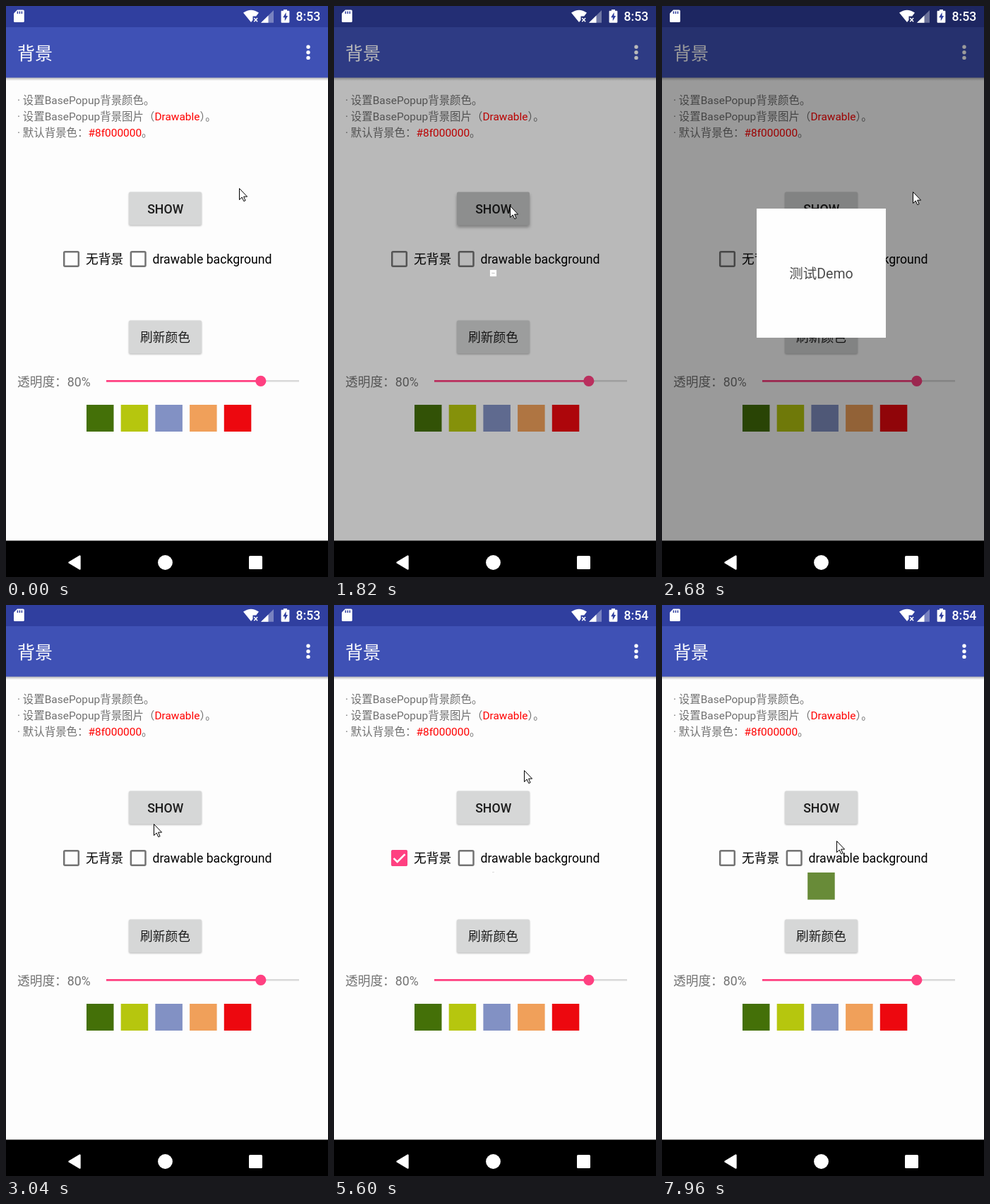
An HTML page that plays this animation: 456 px wide and 809 px high, repeating every 7.99 s.

```html
<!DOCTYPE html>
<html lang="zh-CN">
<head>
<meta charset="utf-8">
<title>背景</title>
<style>
html, body { margin: 0; width: 100%; height: 100%; overflow: hidden; background: #fdfdfd; }
svg { display: block; width: 456px; height: 809px; font: 17.7px Roboto, "Noto Sans CJK SC", "Noto Sans CJK", sans-serif; }
text { white-space: pre; }
.note { font-size: 15.45px; fill: #707070; }
.red { fill: #f00; }
.mid { text-anchor: middle; }
.btn { fill: #d6d7d7; filter: drop-shadow(0 1px 1px rgba(0,0,0,.28)); }
.btn.up { filter: drop-shadow(0 3px 2px rgba(0,0,0,.32)); }
.box { fill: none; stroke: #737373; stroke-width: 2.5; }
</style>
</head>
<body>
<svg viewBox="0 0 456 809">
  <rect width="456" height="809" fill="#fdfdfd"/>
  <defs>
    <linearGradient id="fade" x2="0" y2="1">
      <stop stop-opacity=".3"/><stop offset="1" stop-opacity="0"/>
    </linearGradient>
  </defs>
  <rect y="101" width="456" height="5" fill="url(#fade)"/>
  <rect y="30" width="456" height="71.5" fill="#3f51b5"/>
  <rect width="456" height="30" fill="#303f9f"/>
  <text x="16" y="76" font-size="25" fill="#fff">背景</text>
  <g fill="#fff">
    <circle cx="428" cy="58" r="2.7"/><circle cx="428" cy="65.7" r="2.7"/><circle cx="428" cy="73.4" r="2.7"/>
  </g>

  <text class="note" x="16" y="138.7">· 设置BasePopup背景颜色。</text>
  <text class="note" x="16" y="161.9">· 设置BasePopup背景图片（<tspan class="red">Drawable</tspan>）。</text>
  <text class="note" x="16" y="185">· 默认背景色：<tspan class="red">#8f000000</tspan>。</text>

  <rect id="show" class="btn" x="174" y="263.5" width="103" height="47" rx="2"/>
  <text class="mid" x="225.7" y="294" font-weight="500" fill="#1c1c1c">SHOW</text>
  <rect class="btn" x="174" y="445.5" width="103" height="47" rx="2"/>
  <text class="mid" x="225.5" y="475.5" fill="#1c1c1c">刷新颜色</text>

  <circle id="ripple" cx="92" cy="358.5" r="25" fill="#ff4081"/>
  <rect class="box" x="82.2" y="348.2" width="20.6" height="20.6" rx="1.5"/>
  <g id="check">
    <rect x="81" y="347" width="23" height="23" rx="2.5" fill="#ff4081"/>
    <path d="M84.5 358.8l5.2 5.2 10.8-10.8" fill="none" stroke="#fff" stroke-width="2.6"/>
  </g>
  <text x="113" y="365.3">无背景</text>
  <rect class="box" x="176.9" y="348.2" width="20.6" height="20.6" rx="1.5"/>
  <text x="207.5" y="365.3">drawable background</text>

  <text x="16" y="539" fill="#737373">透明度：80%</text>
  <path d="M361 531.3H415" stroke="#d9d9d9" stroke-width="2.4"/>
  <path d="M142 531.3H361" stroke="#ff4081" stroke-width="2.8"/>
  <circle cx="360.8" cy="531.3" r="7.6" fill="#ff4081"/>
  <g id="swatches"></g>
  <rect id="chip" width="38.5" height="38.5" fill="#447008" opacity=".8"/>

  <rect id="dim" width="456" height="758"/>
  <g id="popup">
    <rect x="-96.5" y="-96.5" width="193" height="193" fill="#fefefe"/>
    <text class="mid" y="7.5" font-size="20.6" fill="#4c4c4c">测试Demo</text>
  </g>

  <g fill="#fff">
    <path d="M16 5.5h8.2q1.6 0 1.6 1.6v14.4q0 1.6-1.6 1.6H12.6q-1.6 0-1.6-1.6V10.5z"/>
    <path d="M16.4 7.5v3.6M19.4 7.5v3.6M22.4 7.5v3.6" stroke="#303f9f" stroke-width="1.5"/>
    <path d="M336 9.6Q347 2 358 9.6L354.2 14.5H349.5V20L347 23z"/>
    <path d="M351.3 17l4.8 5.2M356.1 17l-4.8 5.2" stroke="#fff" stroke-width="1.5"/>
    <path d="M361 23.7L379 6v17.7z" opacity=".35"/>
    <path d="M361 23.7L371.5 13.4v10.3z"/>
    <path d="M393 5h5v1.8h2.4q1 0 1 1v14.9q0 1-1 1h-9.8q-1 0-1-1V7.8q0-1 1-1H393z"/>
    <path d="M396.6 9l-4.4 7.2h2.6v5l4.4-7.3h-2.6z" fill="#303f9f"/>
    <text id="clock" x="410.5" y="21.3" font-weight="500"></text>
  </g>

  <rect y="757.5" width="456" height="52"/>
  <g fill="#fff">
    <path d="M104.5 779.5v18L89.5 788.5z" stroke="#fff" stroke-width="2.4" stroke-linejoin="round"/>
    <circle cx="225.5" cy="788.5" r="10.4"/>
    <rect x="344" y="779" width="19" height="19" rx="1.5"/>
  </g>

  <path id="cursor" d="M.5.5v16l3.7-3.5 2.6 5.6 2.3-1-2.5-5.5h5z" fill="#fff" stroke="#000"/>
</svg>
<script>
const LOOP = 7990, STEP = 30;
const $ = id => document.getElementById(id);
const ratio = (t, start, span) => Math.min(1, Math.max(0, (t - start) / span));
const inOut = u => (1 - Math.cos(Math.PI * u)) / 2;
const out = u => 1 - (1 - u) ** 2;

// Bursts of motion advance in steps of 30 ms
const bursts = [0, 740, 1760, 2650, 3680, 4290, 5350, 6160, 6670, 7610];

// Pointer tip: time, x, y
const track = [
  [740, 330, 258], [1090, 249, 283], [1950, 249, 283], [2310, 355, 263],
  [2680, 355, 263], [3040, 209, 310], [3280, 91, 355], [3690, 91, 355],
  [4130, 207, 295], [4400, 207, 295], [4810, 272, 229], [5470, 272, 229],
  [5590, 269, 234], [6130, 145, 317], [6160, 145, 317], [6490, 101, 352],
  [6700, 101, 352], [7270, 148, 601], [7390, 135, 590], [7610, 135, 590],
  [7940, 247, 334]
];

$('swatches').innerHTML = ['#447008', '#b6c60e', '#8291c4', '#f0a05a', '#ed080f']
  .map((c, i) => `<rect x="${114 + i * 48.7}" y="565" width="38.5" height="38" fill="${c}"/>`).join('');

function pointer(t) {
  const i = track.findIndex(k => k[0] > t);
  if (i < 0) return track.at(-1).slice(1);
  if (!i) return track[0].slice(1);
  const [t0, x0, y0] = track[i - 1], [t1, x1, y1] = track[i], u = ratio(t, t0, t1 - t0);
  return [x0 + (x1 - x0) * u, y0 + (y1 - y0) * u];
}

const popScale = (t, open, close) => inOut(ratio(t, open, 300)) - inOut(ratio(t, close, 300));
const within = (t, a, b) => t >= a && t < b;
const show = (id, on) => $(id).setAttribute('visibility', on ? 'visible' : 'hidden');

function draw(now) {
  const start = bursts.findLast(b => b <= now);
  const t = start + Math.floor((now - start) / STEP) * STEP;

  $('cursor').setAttribute('transform', `translate(${pointer(t)})`);
  $('clock').textContent = within(t, 3160, LOOP) ? '8:54' : '8:53';

  const pressed = within(t, 1760, 2050) || within(t, 4290, 4550);
  $('show').style.fill = pressed ? '#c1c2c2' : '';
  $('show').classList.toggle('up', within(t, 1590, 2050) || pressed);

  $('dim').setAttribute('opacity', .56 * (out(ratio(t, 1757, 225)) - out(ratio(t, 2636, 270))));
  const scale = popScale(t, 1778, 2636) + popScale(t, 4300, 5323);
  show('popup', scale > .001);
  $('popup').setAttribute('transform', `translate(225.5 378.5) scale(${scale})`);

  show('check', within(t, 3680, 6670));
  $('ripple').setAttribute('opacity', within(t, 3680, 4040) ? .18 * (1 - ratio(t, 3740, 300)) : 0);

  const fly = ratio(t, 7640, 300);
  show('chip', fly > 0);
  $('chip').setAttribute('x', 114 + 92.2 * out(fly));
  $('chip').setAttribute('y', 565 - 186 * fly ** 1.5);
}

function frame() {
  draw(performance.now() % LOOP);
  requestAnimationFrame(frame);
}
frame();
</script>
</body>
</html>
```
